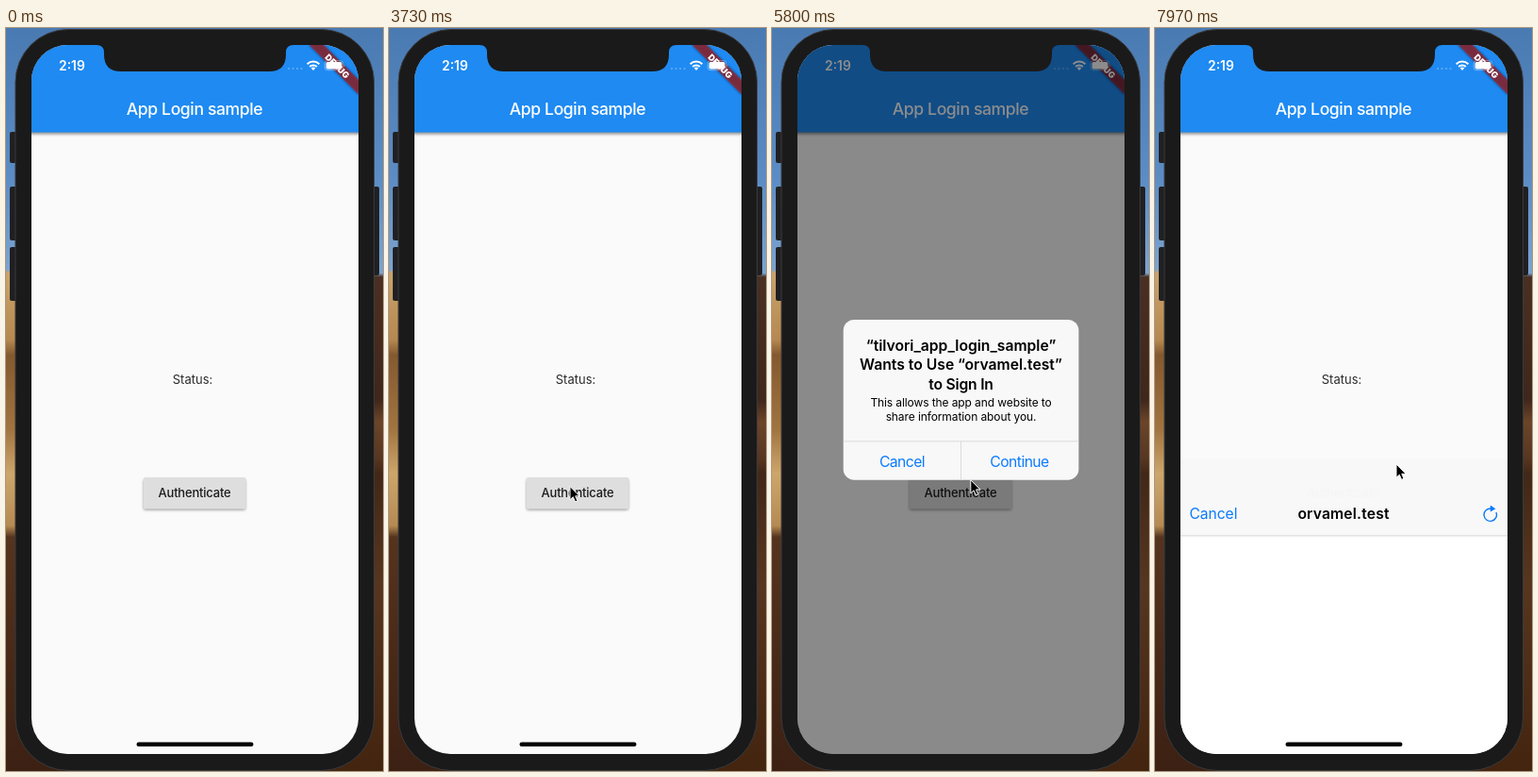
Write an HTML page that moves like this. It is 400 px wide and 787 px high and loops after 8000 ms.

```html
<!DOCTYPE html>
<html lang="en">
<head>
<meta charset="utf-8">
<title>App Login sample</title>
<style>
  html, body { margin: 0; width: 100%; height: 100%; overflow: hidden; background: #1a1a1a; }
  svg { display: block; width: 100vw; height: 100vh; }
  text { font-family: Inter, sans-serif; }
  .mid { text-anchor: middle; }
  .bold { font-size: 15.7px; font-weight: 600; }
  .link { font-size: 15.7px; fill: #0a7aff; }
  .tight { letter-spacing: -.55px; }
  .note { font-size: 12px; letter-spacing: -.1px; }
</style>
</head>
<body>
<svg viewBox="0 0 400 787" preserveAspectRatio="none">
  <defs>
    <linearGradient id="left" x2="0" y2="1">
      <stop offset="0" stop-color="#4a7ab2"/>
      <stop offset=".2" stop-color="#5b8cc4"/>
      <stop offset=".325" stop-color="#7ba3cf"/>
      <stop offset=".33" stop-color="#c9a36a"/>
      <stop offset=".42" stop-color="#b5884f"/>
      <stop offset=".44" stop-color="#84592f"/>
      <stop offset=".54" stop-color="#a1743f"/>
      <stop offset=".6" stop-color="#cda66b"/>
      <stop offset=".67" stop-color="#b58a52"/>
      <stop offset=".685" stop-color="#55341e"/>
      <stop offset="1" stop-color="#3c2013"/>
    </linearGradient>
    <linearGradient id="right" x2="0" y2="1">
      <stop offset="0" stop-color="#4a7ab2"/>
      <stop offset=".2" stop-color="#5b8cc4"/>
      <stop offset=".33" stop-color="#7ba3cf"/>
      <stop offset=".335" stop-color="#4a3022"/>
      <stop offset=".5" stop-color="#3f271b"/>
      <stop offset=".53" stop-color="#6c4529"/>
      <stop offset=".58" stop-color="#573621"/>
      <stop offset=".6" stop-color="#422818"/>
      <stop offset=".75" stop-color="#57361f"/>
      <stop offset="1" stop-color="#43240f"/>
    </linearGradient>
    <clipPath id="screen"><rect x="27" y="18" width="347" height="751" rx="38"/></clipPath>
    <filter id="soft" x="-20%" y="-40%" width="140%" height="180%"><feGaussianBlur stdDeviation="1.7"/></filter>
  </defs>

  <rect width="200" height="787" fill="url(#left)"/>
  <rect x="200" width="200" height="787" fill="url(#right)"/>

  <g fill="#202022">
    <rect x="4" y="110" width="8" height="33" rx="2"/>
    <rect x="4" y="168" width="8" height="57" rx="2"/>
    <rect x="4" y="232" width="8" height="57" rx="2"/>
    <rect x="388" y="168" width="8" height="94" rx="2"/>
  </g>
  <rect x="10" y="1.5" width="380.5" height="785" rx="56" fill="#1a1a1a" stroke="#3a3a3c"/>

  <g clip-path="url(#screen)">
    <rect x="27" y="18" width="347" height="751" fill="#fafafa"/>
    <rect x="20" y="20" width="361" height="92.5" fill="#000" opacity=".42" filter="url(#soft)"/>
    <rect x="27" y="18" width="347" height="92.5" fill="#1e8af2"/>
    <text class="mid" x="200" y="91.5" fill="#fff" font-size="17.6" font-weight="500" letter-spacing="-.4">App Login sample</text>
    <text class="mid" x="198" y="377" fill="#2c2c2c" font-size="13">Status:</text>

    <rect x="146" y="478" width="108" height="32.5" rx="2" fill="#000" opacity=".4" filter="url(#soft)"/>
    <rect x="146" y="476" width="108.5" height="33.5" rx="2" fill="#dedede"/>
    <text class="mid" x="200" y="497" fill="#1c1c1c" font-size="13" font-weight="500" letter-spacing="-.2">Authenticate</text>

    <g transform="translate(374 18) rotate(45)">
      <rect x="-37" y="26" width="74" height="11" fill="#000" opacity=".5" filter="url(#soft)"/>
      <rect x="-37" y="26" width="74" height="11" fill="#b71c1c" opacity=".63"/>
      <text class="mid" y="35.2" fill="#fff" font-size="9.2" font-weight="900">DEBUG</text>
    </g>

    <g fill="#fff">
      <text x="56" y="45" font-size="13.9" font-weight="600">2:19</text>
      <g opacity=".24">
        <circle cx="300" cy="43" r="1.2"/><circle cx="304.5" cy="43" r="1.2"/>
        <circle cx="309" cy="43" r="1.2"/><circle cx="313.5" cy="43" r="1.2"/>
      </g>
      <path d="M326 45l-2.3-2.4a3.3 3.3 0 0 1 4.6 0z"/>
      <g fill="none" stroke="#fff" stroke-width="1.9">
        <path d="M322.2 41a5.4 5.4 0 0 1 7.6 0"/>
        <path d="M319.6 38.2a9.1 9.1 0 0 1 12.8 0"/>
      </g>
      <rect x="338.2" y="34.7" width="19.6" height="10" rx="2.8" fill="none" stroke="#fff" stroke-opacity=".4" stroke-width=".9"/>
      <rect x="339.6" y="36" width="16.8" height="7.4" rx="1.6"/>
      <path d="M358.8 38.2q1.6 1.5 0 3z" opacity=".5"/>
    </g>

    <rect id="dim" x="27" y="18" width="347" height="751"/>

    <g id="alert">
      <rect id="panel" x="75.7" y="309" width="249.7" height="169.7" rx="11.5" fill="#f8f8f8"/>
      <g id="words">
        <path d="M75.7 437.8H325.4M200.5 437.8V478.7" stroke="#d9d9db" stroke-width=".9"/>
        <g class="mid bold">
          <text x="200.5" y="342">“tilvori_app_login_sample”</text>
          <text x="200.5" y="362">Wants to Use “orvamel.test”</text>
          <text x="200.5" y="382.5" letter-spacing="-.2">to Sign In</text>
        </g>
        <g class="mid note">
          <text x="200.5" y="401">This allows the app and website to</text>
          <text x="200.5" y="415.5">share information about you.</text>
        </g>
        <g class="mid link tight">
          <text x="138" y="464.8">Cancel</text>
          <text x="262.5" y="464.8">Continue</text>
        </g>
      </g>
    </g>

    <g id="sheet">
      <rect x="27" y="18" width="347" height="81.5" fill="#f8f8f8" fill-opacity=".99"/>
      <rect x="27" y="99.5" width="347" height="670" fill="#fff"/>
      <path d="M27 99.5H374" stroke="#d2d2d4" stroke-width=".9"/>
      <text class="link" x="36.5" y="81.5" letter-spacing="-.1">Cancel</text>
      <text class="mid bold" x="200" y="81.5" letter-spacing=".15">orvamel.test</text>
      <path d="M361.9 74.6A6.7 6.7 0 1 1 356.5 70.6" fill="none" stroke="#0a7aff" stroke-width="1.4"/>
      <path d="M355.8 67.2L361.4 70.8L355.8 74.2z" fill="#0a7aff"/>
    </g>

    <rect id="home" x="138.5" y="756.5" width="124" height="4.6" rx="2.3"/>
  </g>

  <path d="M96 17H305V18Q297 18 297 26V28Q297 46 279 46H122Q104 46 104 28V26Q104 18 96 18z" fill="#1a1a1a"/>

  <path id="cursor" d="M0 0V14.2L3.3 11.2L5.6 16.4L8 15.3L5.8 10.3H10.2z" stroke="#fff" stroke-width="1" stroke-linejoin="round"/>
</svg>
<script>
  const LOOP = 8000;
  const ALERT_IN = 4273, ALERT_OUT = 7205, SHEET_IN = 7893;
  // time, x, y of the pointer tip
  const pointerPath = [
    [900, 330, 800], [1500, 192, 485.5], [5550, 192, 485.5], [6250, 256, 462]
  ];
  const el = id => document.getElementById(id);
  const [dim, alertBox, panel, words, sheet, home, cursor] =
    ['dim', 'alert', 'panel', 'words', 'sheet', 'home', 'cursor'].map(el);

  // Critically damped spring running from 0 to 1
  const spring = (ms, rate) => {
    const x = Math.max(0, ms) / 1000 * rate;
    return 1 - (1 + x) * Math.exp(-x);
  };
  const smooth = x => x * x * (3 - 2 * x);

  function pointerAt(t) {
    const next = pointerPath.findIndex(step => step[0] > t);
    if (next === 0) return pointerPath[0].slice(1);
    if (next < 0) return pointerPath[pointerPath.length - 1].slice(1);
    const [t0, x0, y0] = pointerPath[next - 1], [t1, x1, y1] = pointerPath[next];
    const k = smooth((t - t0) / (t1 - t0));
    return [x0 + (x1 - x0) * k, y0 + (y1 - y0) * k];
  }

  function draw(t) {
    const grow = spring(t - ALERT_IN, 22.86);
    const shown = grow * (1 - spring(t - ALERT_OUT, 22.86));
    const scale = 1.2 - .2 * grow;
    dim.setAttribute('opacity', .45 * shown);
    home.setAttribute('opacity', 1 - shown);
    alertBox.setAttribute('transform', `translate(200.5 394) scale(${scale}) translate(-200.5 -394)`);
    panel.setAttribute('opacity', shown ** .4);
    words.setAttribute('opacity', shown ** .85);

    const drop = 751 * (1 - spring(t - SHEET_IN, 18.25));
    sheet.setAttribute('transform', `translate(0 ${drop})`);
    cursor.setAttribute('transform', `translate(${pointerAt(t)})`);
  }

  const start = performance.now();
  function tick() {
    draw((performance.now() - start) % LOOP);
    requestAnimationFrame(tick);
  }
  draw(0);
  requestAnimationFrame(tick);
</script>
</body>
</html>
```
